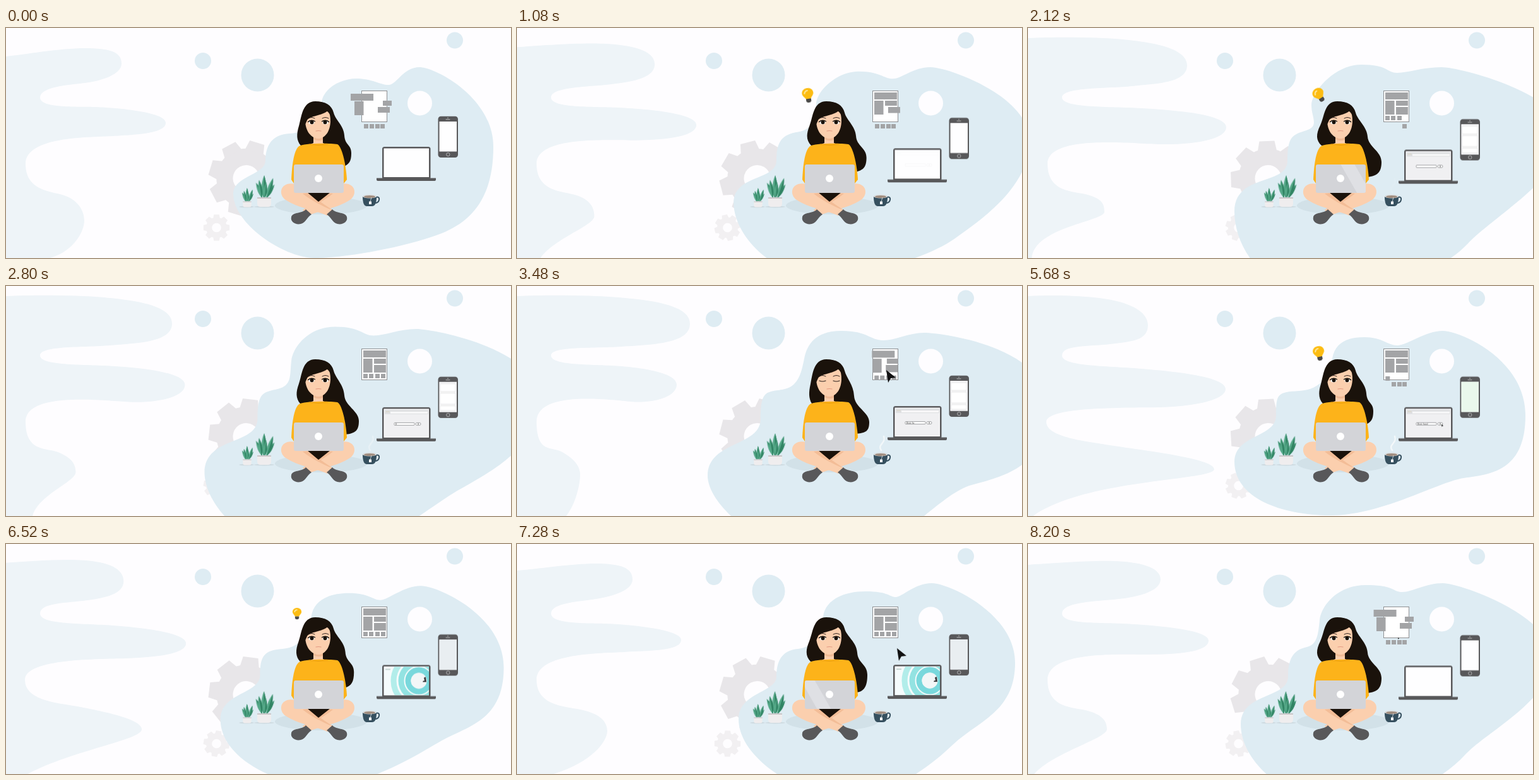
Recreate the animation shown at these times as an HTML page without scripts. Size 800x364 px, loop 8.24 s.

```html
<!DOCTYPE html>
<html lang="en">
<head>
<meta charset="utf-8">
<title>Working from home</title>
<style>
html, body { margin: 0; width: 100%; height: 100%; overflow: hidden; background: #fefdff; }
svg { display: block; width: 800px; height: 364px; }
.loop { animation: 8.24s linear infinite; }
.spot { fill: #deecf3; }
.skin { fill: #fbcfae; }
.dark { fill: #58585a; }
.hair { fill: #1a120b; }
.block rect { fill: #a3a4a6; }

#mist { fill: #eef4f8; animation-name: mist; }
@keyframes mist {
  0% { d: path("M0,45C30,42 85,32 125,32S183,38 183,56 150,84 125,87 54,93 54,110 110,124 140,125 253,132 253,150 200,169 170,171 31,170 31,215 75,258 95,266 124,290 124,305 110,352 70,364H0Z"); }
  25.73% { d: path("M0,16C40,14 110,14 150,18S252,30 252,59 200,88 165,92 54,93 54,110 130,124 180,127 314,136 314,157 255,185 210,184 31,168 31,215 75,258 95,264 121,276 121,291 10,315 6,364H0Z"); }
  42.23% { d: path("M0,16C40,14 115,14 160,18S274,28 274,60 210,93 165,96 54,95 54,110 110,124 150,126 253,136 253,156 215,186 180,183 31,165 31,215 55,254 70,262 100,282 100,298 93,345 78,364H0Z"); }
  53.4% { d: path("M0,16C40,14 110,14 150,18S256,30 256,62 205,92 165,95 54,95 54,110 110,124 150,126 255,136 255,157 215,187 180,184 30,165 30,215 75,258 100,265 150,283 150,298 115,345 65,364H0Z"); }
  68.93% { d: path("M0,16C40,14 85,15 120,20S190,38 190,62 165,88 130,92 54,93 54,110 120,126 180,131 313,144 313,163 255,191 210,192 29,190 29,215 95,246 130,252 295,272 295,290 90,305 8,364H0Z"); }
  88.35% { d: path("M0,42C30,40 85,31 125,31S183,38 183,56 150,83 125,87 54,93 54,110 110,125 140,126 260,134 260,152 205,169 170,171 31,172 31,215 80,257 105,263 143,280 143,296 120,345 58,364H0Z"); }
  99.51%, 100% { d: path("M0,33C30,31 95,26 135,27S210,36 210,56 170,85 135,88 54,93 54,110 110,124 150,126 286,134 286,153 230,175 190,175 31,168 31,215 75,258 95,264 125,278 125,293 40,330 10,364H0Z"); }
}

#blob { animation-name: blob; }
@keyframes blob {
  0% { d: path("M360,262C360,235 411,232 411,210S420,168 450,167 498,140 500,118 530,80 555,80 595,91 607,90 630,62 655,62 772,110 772,188 740,305 690,325 540,364 490,364 360,310 360,262Z"); }
  25.73% { d: path("M327,290C327,230 411,250 411,210S420,169 441,162 449,142 449,122 485,58 528,58 568,71 585,71 625,62 655,62 850,105 850,170 735,300 697,341 570,420 470,420 327,345 327,290Z"); }
  42.23% { d: path("M302,300C302,245 386,255 386,210S395,168 420,164 450,140 455,115 475,71 515,71 560,86 580,86 620,74 645,74 840,95 840,190 775,300 720,315 600,430 500,430 302,350 302,300Z"); }
  53.4% { d: path("M286,292C286,245 370,250 370,205S375,168 410,166 458,140 460,118 475,80 500,80 550,96 570,96 620,82 655,82 850,100 850,240 710,316 640,314 560,363 450,363 286,345 286,292Z"); }
  68.93% { d: path("M327,278C327,235 393,240 393,205S395,168 430,166 478,140 482,115 505,81 533,81 570,94 585,94 630,71 657,71 788,115 788,205 730,298 690,304 560,363 480,363 327,335 327,278Z"); }
  88.35% { d: path("M351,277C351,235 411,235 411,210S420,168 445,166 482,140 485,115 515,75 552,75 590,84 600,84 630,62 657,62 789,110 789,188 730,280 690,318 590,400 520,400 351,340 351,277Z"); }
  99.51%, 100% { d: path("M337,285C337,235 412,245 412,210S425,167 442,163 460,140 462,120 488,65 535,65 577,76 593,76 630,62 657,62 830,113 830,180 727,296 692,334 590,410 500,410 337,345 337,285Z"); }
}

#locks { animation-name: locks; }
@keyframes locks {
  0%, 68.93% { d: path("M490,116C506,116 516,122 519,134S535,154 536,170 547,184 547,198 543,215 536,219L500,200 467,186C460,178 460,168 464,155S469,116 490,116Z"); }
  25.73%, 99.51%, 100% { d: path("M490,116C506,116 516,122 519,134S537,156 538,172 560,195 560,212 553,234 538,236L500,200 465,186C456,178 456,168 463,154S469,116 490,116Z"); }
  42.23% { d: path("M490,116C506,116 516,122 519,134S533,156 534,174 558,200 558,215 553,232 538,234L500,200 467,186C462,178 462,168 465,155S469,116 490,116Z"); }
  53.4% { d: path("M490,116C506,116 516,122 519,134S532,156 533,174 553,198 553,213 548,230 538,232L500,200 467,186C462,178 462,168 465,155S469,116 490,116Z"); }
  88.35% { d: path("M490,116C506,116 516,122 519,134S538,155 539,172 555,190 555,207 551,233 538,235L500,200 465,186C457,178 457,168 463,154S469,116 490,116Z"); }
}

#open { animation-name: look; }
#shut { animation-name: look-shut; opacity: 0; }
@keyframes look { 0%, 41.2% { opacity: 1; } 41.3%, 43.2% { opacity: 0; } 43.3%, 100% { opacity: 1; } }
@keyframes look-shut { 0%, 41.2% { opacity: 0; } 41.3%, 43.2% { opacity: 1; } 43.3%, 100% { opacity: 0; } }

#shine { animation-name: shine; }
@keyframes shine {
  0%, 20% { transform: translateX(-75px); }
  28.7%, 87% { transform: translateX(75px); }
  87.01% { transform: translateX(-50px); }
  93%, 100% { transform: translateX(75px); }
}

#steam { animation-name: steam; opacity: 0; }
@keyframes steam {
  0%, 25% { opacity: 0; } 27%, 32% { opacity: .3; } 42% { opacity: 1; } 50% { opacity: 0; }
  53.4% { opacity: .3; } 66%, 71% { opacity: 1; } 79%, 100% { opacity: 0; }
}

#devices { animation-name: bob; animation-timing-function: ease-in-out; }
@keyframes bob {
  0% { transform: none; }
  25.73% { transform: translateY(4.5px); }
  53.4% { transform: translateY(.8px); }
  72% { transform: translateY(3.8px); }
  86% { transform: translateY(3px); }
  99.51%, 100% { transform: translateY(4.5px); }
}
.search { animation-name: search; opacity: 0; }
@keyframes search { 0%, 13% { opacity: 0; } 15%, 72% { opacity: 1; } 74%, 100% { opacity: 0; } }
.result { animation-name: result; opacity: 0; }
@keyframes result { 0%, 73% { opacity: 0; } 76%, 93% { opacity: 1; } 97%, 100% { opacity: 0; } }
#typed { animation-name: typed; }
@keyframes typed { 0%, 30% { width: 0; animation-timing-function: steps(9); } 51%, 100% { width: 24px; } }
#pointer { animation-name: pointer; }
@keyframes pointer {
  0%, 62% { transform: translate(664px, 229px) scale(.22); opacity: 0; }
  64% { opacity: 1; }
  68.9%, 71% { transform: translate(655px, 215px) scale(.22); opacity: 1; }
  73%, 100% { transform: translate(655px, 215px) scale(.22); opacity: 0; }
}
#cards { animation-name: cards; opacity: 0; }
@keyframes cards { 0%, 13% { opacity: 0; } 16%, 58% { opacity: 1; } 61%, 100% { opacity: 0; } }
#green { animation-name: green; opacity: 0; }
@keyframes green { 0%, 59% { opacity: 0; } 62%, 74% { opacity: 1; } 78%, 100% { opacity: 0; } }

.half { animation: 4.12s linear infinite; }
#cursor { animation-name: cursor; }
@keyframes cursor {
  0% { transform: translate(586px, 148px) scale(0); }
  6.8% { transform: translate(586px, 148px) scale(.15); }
  9%, 69% { transform: translate(586px, 148px) scale(0); }
  69.01% { transform: translate(612px, 184px) scale(0); }
  73% { transform: translate(607px, 174px) scale(1); }
  76.7% { transform: translate(602px, 165px) scale(1); }
  82%, 86% { transform: translate(585px, 133px) scale(1); }
  95%, 100% { transform: translate(586px, 148px) scale(.15); }
}
#bulb { animation-name: bulb; }
@keyframes bulb {
  0%, 8% { transform: translate(461px, 124px) scale(0); }
  14% { transform: translate(461px, 107px) scale(1) rotate(8deg); }
  22% { transform: translate(461px, 107px) rotate(-28deg); }
  30% { transform: translate(461px, 107px) rotate(8deg); }
  37.9% { transform: translate(461px, 107px) rotate(-12deg); }
  45% { transform: translate(461px, 107px) rotate(8deg); }
  51.5% { transform: translate(461.5px, 106.5px) rotate(-32deg); }
  57% { transform: translate(461px, 107px) scale(1) rotate(0); }
  63%, 100% { transform: translate(461px, 124px) scale(0); }
}
#glint { animation-name: glint; opacity: 0; }
@keyframes glint { 0%, 5% { opacity: 0; } 6%, 8% { opacity: 1; } 9%, 100% { opacity: 0; } }

.sway { animation: sway 2.06s ease-in-out infinite alternate; }
@keyframes sway { from { transform: rotate(1.5deg); } to { transform: rotate(-3deg); } }
</style>
</head>
<body>
<svg viewBox="0 0 800 364" xmlns="http://www.w3.org/2000/svg">
<defs>
  <path id="tooth" d="M-15-44L-12-59H12L15-44Z"/>
  <g id="teeth"><use href="#tooth"/><use href="#tooth" transform="rotate(90)"/><use href="#tooth" transform="rotate(180)"/><use href="#tooth" transform="rotate(270)"/></g>
  <g id="gear"><circle r="34" fill="none" stroke="currentColor" stroke-width="26"/><g fill="currentColor"><use href="#teeth"/><use href="#teeth" transform="rotate(45)"/></g></g>
  <g id="leaf"><path fill="#55a888" d="M0,0C-5,-10 -5,-22 0,-36C5,-22 5,-10 0,0Z"/><path fill="#2f8262" d="M0,0C5,-10 5,-22 0,-36Z"/></g>
  <g id="plant">
    <g class="sway">
      <use href="#leaf" transform="translate(-3) rotate(-24) scale(.72)"/><use href="#leaf" transform="translate(3) rotate(30) scale(.7)"/>
      <use href="#leaf" transform="translate(-1)"/>
      <use href="#leaf" transform="translate(-4) rotate(-10) scale(.8)"/><use href="#leaf" transform="translate(4) rotate(16) scale(.92)"/>
      <use href="#leaf" transform="translate(1) rotate(3) scale(.7)"/>
    </g>
    <path fill="#efedee" d="M-11-1H11V9Q11,14 6,14H-6Q-11,14 -11,9Z"/><path fill="#c9c6c8" d="M-11-1H11V1H-11Z"/>
  </g>
  <g id="leg">
    <path class="skin" d="M458,247C435,242 430,263 443,272C462,285 496,290 509,297L518,288C505,281 492,270 478,261Z"/>
    <path fill="#f3bd97" d="M470,262C482,272 500,281 511,286L518,288C505,281 492,270 480,261Z"/>
  </g>
  <path id="shoe" class="dark" d="M508,295L517,287C523,294 538,291 540,299C542,307 533,312 525,310C517,308 515,299 508,295Z"/>
  <path id="arrow" d="M0,0L15,12 7,13 3,20Z"/>
  <clipPath id="lid"><rect x="456" y="216" width="79" height="45" rx="3"/></clipPath>
  <clipPath id="screen"><rect x="599" y="191" width="71" height="45"/></clipPath>
  <clipPath id="type"><rect id="typed" class="loop" x="616" y="209" width="0" height="8"/></clipPath>
</defs>

<path id="mist" class="loop"/>
<g transform="translate(380.5 238)" color="#e8e6e9">
  <use href="#gear"><animateTransform attributeName="transform" type="rotate" from="17" to="118" dur="8.24s" repeatCount="indefinite"/></use>
</g>
<g transform="translate(333.5 316) scale(.35)" color="#f2f0f2">
  <use href="#gear"><animateTransform attributeName="transform" type="rotate" from="0" to="-101" dur="8.24s" repeatCount="indefinite"/></use>
</g>
<path id="blob" class="spot loop"/>
<g class="spot"><circle cx="312" cy="52" r="13"/><circle cx="398.5" cy="74.5" r="26"/><circle cx="711" cy="19.5" r="13"/></g>
<circle cx="655.5" cy="119" r="19.5" fill="#fefdff"/>

<!-- plants -->
<g fill="#cfdbe1"><ellipse cx="381" cy="283" rx="12" ry="1.5"/><ellipse cx="409" cy="283" rx="16" ry="1.5"/></g>
<use href="#plant" transform="translate(409 269)"/>
<use href="#plant" transform="translate(382 275) scale(.61)"/>

<!-- woman -->
<ellipse cx="499" cy="281" rx="73" ry="14" fill="#d2e1e8"/>
<path id="locks" class="hair loop"/>
<path class="skin" d="M487,168H502V182L512,186 494,192 477,186 487,182Z"/>
<path fill="#f0bb96" d="M487,172Q495,178 502,172V177Q494,180 487,176Z"/>
<path class="skin" d="M474,142C474,124 514,122 514,142C515,160 508,174 495,175C481,174 473,160 474,142Z"/>
<path class="hair" d="M472,157C468,128 479,117 495,117C515,117 521,137 514,156C514,142 514,136 511,130C500,140 482,138 477,146Z"/>
<g fill="none" stroke="#2c211d" stroke-linecap="round">
  <path d="M479,143Q484,140 489,143M501,143Q506,140 511,143" stroke-width="1"/>
  <path d="M491,163Q495,162 499,163" stroke="#e39a83" stroke-width="1.2"/>
  <path id="shut" class="loop" d="M479,150Q484,152 489,150M501,150Q506,152 511,150" stroke-width="1.2"/>
</g>
<g id="open" class="loop">
  <g fill="#fff"><ellipse cx="484" cy="149.5" rx="4.5" ry="3"/><ellipse cx="506" cy="149.5" rx="4.5" ry="3"/></g>
  <g class="hair"><circle cx="484.5" cy="149.3" r="3"/><circle cx="505.5" cy="149.3" r="3"/></g>
  <path d="M478,149Q483,144 490,148M500,148Q507,144 512,149" fill="none" stroke="#130f0c" stroke-width="1.3"/>
</g>
<path fill="#fdb31a" d="M466,186C478,182 512,182 525,184C533,188 539,220 540,240L535,246H456L452,240C453,218 456,190 466,186Z"/>
<path d="M480,184Q495,187 510,184" fill="none" stroke="#e99d0c"/>
<use href="#leg" transform="translate(988) scale(-1 1)"/>
<use href="#leg"/>
<use href="#shoe" transform="translate(992) scale(-1 1)"/>
<use href="#shoe"/>
<path class="hair" d="M477,260H514L495,275Z"/>
<rect x="456" y="216" width="79" height="45" rx="3" fill="#d3d4d8"/>
<g clip-path="url(#lid)"><path id="shine" class="loop" fill="#dfe0e4" d="M468,210H490L522,266H500Z"/></g>
<circle cx="495" cy="238" r="6" fill="#fff"/>

<!-- bulb -->
<path id="glint" class="half" fill="#a6a9a8" d="M453,125Q459,119 466,125Z"/>
<g id="bulb" class="half">
  <path fill="#fcbc12" d="M-4,5C-5,2 -9,0 -9,-4C-9,-9 -5,-12 0,-12C5,-12 9,-9 9,-4C9,0 5,2 4,5Z"/>
  <path d="M-5,-4Q-4,-8 0,-8" fill="none" stroke="#ffe9a0" stroke-width="2" stroke-linecap="round"/>
  <path fill="#4b4a49" d="M-4,5H4V9L2,11H-2L-4,9Z"/>
</g>

<!-- cup -->
<path id="steam" class="loop" d="M577,260C570,251 585,249 581,238" fill="none" stroke="#f3f8fa" stroke-width="2.5" stroke-linecap="round"/>
<path d="M585,268Q592,266 591,272Q590,277 584,277" fill="none" stroke="#36505f" stroke-width="2"/>
<path fill="#36505f" d="M565,267H587Q587,282 580,282H571Q565,281 565,267Z"/>
<ellipse cx="576" cy="266.500" rx="11" ry="3" fill="#d9dcdd"/><ellipse cx="576" cy="267" rx="9" ry="2" fill="#a08c7e"/>
<path d="M579,268L577,275" stroke="#fff" stroke-width=".7"/><rect x="575" y="274.5" width="4" height="4.5" fill="#fff"/>

<!-- wireframe -->
<rect x="563.5" y="99.5" width="40" height="49" fill="#fff" stroke="#8e8f91"/>
<g class="block">
  <rect x="566" y="102" width="36" height="11"><animateTransform attributeName="transform" type="translate" values="-20 2;0 0;0 0;-18 2;-18.500 2" keyTimes="0;.136;.825;.922;1" dur="4.12s" repeatCount="indefinite"/></rect>
  <rect x="566" y="115" width="14.5" height="22"><animateTransform attributeName="transform" type="translate" values="-14 1;-14 1;0 0;0 0;-14 1;-14 1" keyTimes="0;.12;.2;.825;.922;1" dur="4.12s" repeatCount="indefinite"/></rect>
  <rect x="583" y="115" width="19" height="8"><animateTransform attributeName="transform" type="translate" values="14 0;14 0;0 0;0 0;14 0;14 0" keyTimes="0;.19;.26;.825;.922;1" dur="4.12s" repeatCount="indefinite"/><animate attributeName="width" values="14;14;19;19;14;14" keyTimes="0;.19;.26;.825;.922;1" dur="4.12s" repeatCount="indefinite"/></rect>
  <rect x="583" y="125" width="19" height="12"><animateTransform attributeName="transform" type="translate" values="6 0;6 0;0 0;0 0;6 0;6 0" keyTimes="0;.25;.32;.825;.922;1" dur="4.12s" repeatCount="indefinite"/><animate attributeName="height" values="9;9;12;12;9;9" keyTimes="0;.25;.32;.825;.922;1" dur="4.12s" repeatCount="indefinite"/></rect>
  <rect x="566" y="139" width="7" height="7"><animateTransform attributeName="transform" type="translate" values="1 13;1 13;0 0;0 0;1 13;1 13" keyTimes="0;.33;.4;.825;.922;1" dur="4.12s" repeatCount="indefinite"/></rect>
  <rect x="575" y="139" width="7" height="7"><animateTransform attributeName="transform" type="translate" values="1 13;1 13;0 0;0 0;1 13;1 13" keyTimes="0;.39;.45;.825;.922;1" dur="4.12s" repeatCount="indefinite"/></rect>
  <rect x="585" y="139" width="7" height="7"><animateTransform attributeName="transform" type="translate" values="0 13;0 13;0 0;0 0;0 13;0 13" keyTimes="0;.45;.51;.825;.922;1" dur="4.12s" repeatCount="indefinite"/></rect>
  <rect x="594" y="139" width="7" height="7"><animateTransform attributeName="transform" type="translate" values="-1 13;-1 13;0 0;0 0;-1 13;-1 13" keyTimes="0;.52;.58;.825;.922;1" dur="4.12s" repeatCount="indefinite"/></rect>
</g>
<use id="cursor" class="half" href="#arrow" fill="#111"/>

<g id="devices" class="loop">
  <!-- laptop -->
  <rect class="dark" x="596" y="188" width="76.5" height="52" rx="3.5"/>
  <path class="dark" d="M587,237.5H681V240Q681,242 678,242H590Q587,242 587,240Z"/>
  <rect x="598.500" y="190.500" width="71.500" height="45.500" fill="#fefeff"/>
  <g clip-path="url(#screen)">
    <g class="search loop">
      <rect x="600" y="192" width="69" height="43" fill="#f0f0f2"/>
      <rect x="600" y="192" width="69" height="7" fill="#dfe0e2"/>
      <rect x="609" y="195" width="59" height="3" fill="#f8f8f9"/>
      <path d="M602,195h5" stroke="#d4c79a" stroke-dasharray="1 1"/>
      <g fill="#fff" stroke="#8d8e91" stroke-width=".8"><rect x="615" y="212.500" width="32" height="4" rx="1"/><rect x="649" y="212.500" width="8" height="4" rx="2"/></g>
      <circle cx="653" cy="214.500" r="1" fill="#777"/>
      <text x="617" y="215.800" font-family="Open Sans, sans-serif" font-size="3.7" fill="#333" clip-path="url(#type)">Best food</text>
    </g>
    <use id="pointer" class="loop" href="#arrow" fill="#222"/>
    <g class="result loop">
      <rect x="599" y="190" width="71" height="46" fill="#f5fbfc"/>
      <g fill="none" stroke-width="9"><circle cx="654" cy="213" r="40" stroke="#b2edea"/><circle cx="654" cy="213" r="28" stroke="#93e3e2"/><circle cx="654" cy="213" r="17" stroke="#79d8dc"/></g>
      <circle cx="654" cy="213" r="12.500" fill="#f2f6f7"/>
      <path d="M662,208l3,-1 1,8h-6l1,-2h2Z" fill="#3a3a3d"/>
      <rect x="601" y="194" width="8" height="2" fill="#c9d7d4"/>
    </g>
  </g>

  <!-- phone -->
  <rect class="dark" x="684.500" y="139.700" width="31.500" height="65.300" rx="4.500"/>
  <rect x="686.500" y="148" width="27.500" height="47.500" fill="#fefeff"/>
  <g id="cards" class="loop"><rect x="686.500" y="148" width="27.500" height="47.500" fill="#f4f4f5"/><path fill="#fff" stroke="#e2e2e4" stroke-width=".6" d="M688,151h24v12h-24zM688,166h24v17h-24zM688,186h24v7h-24z"/></g>
  <rect id="green" class="loop" x="686.500" y="148" width="27.500" height="47.500" fill="#eaf8ec"/>
  <rect class="result loop" x="686.500" y="148" width="27.500" height="47.500" fill="#e9eef1"/>
  <path d="M697,144.800h6M699.500,142.300h1" stroke="#bbb" stroke-linecap="round"/>
  <circle cx="700.300" cy="200.200" r="2.700" fill="none" stroke="#c8c8ca" stroke-width=".8"/>
</g>
</svg>
</body>
</html>
```
